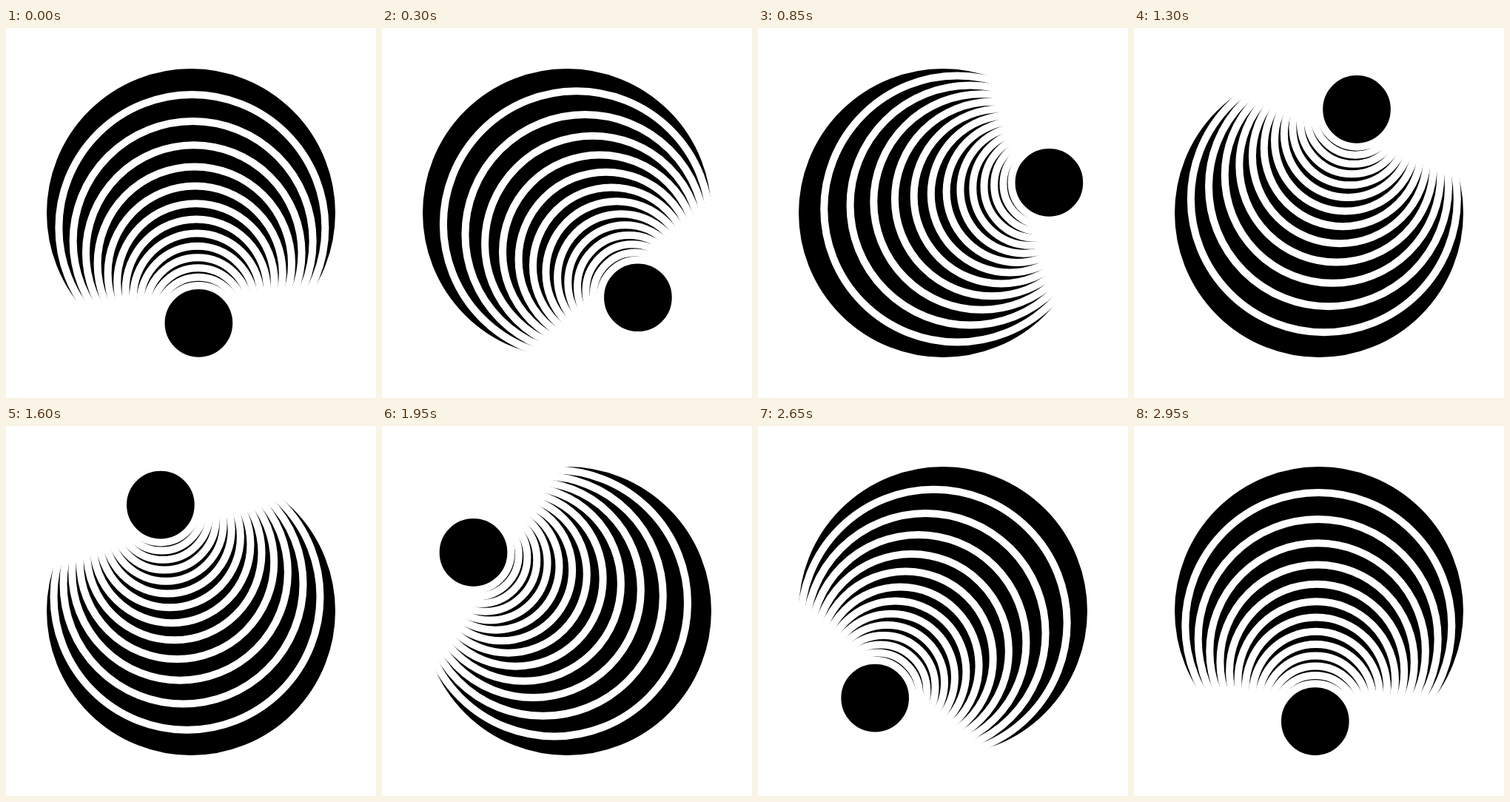
An HTML page with a canvas that plays this animation: 500 px wide and 500 px high, repeating every 3 s.

```html
<!DOCTYPE html>
<html lang="en">
<head>
<meta charset="utf-8">
<title>Rolling circles</title>
<style>
  html, body { margin: 0; width: 100%; height: 100%; overflow: hidden; background: #fff; }
  canvas { display: block; width: 500px; height: 500px; }
</style>
</head>
<body>
<canvas id="stage" width="500" height="500"></canvas>
<script>
const ctx = document.getElementById('stage').getContext('2d');
const CENTER = 250, RADIUS = 200, SHRINK = 0.9, COUNT = 14;
const STEP = 50, STEPS = 60, START_DEG = 4;

// Nested discs, all touching the outer rim in the same direction.
function draw(step) {
  const angle = (START_DEG + step * 360 / STEPS) * Math.PI / 180;
  ctx.fillStyle = '#fff';
  ctx.fillRect(0, 0, 500, 500);
  ctx.fillStyle = '#000';
  ctx.strokeStyle = '#fff';
  ctx.lineWidth = 10;
  for (let i = 0; i < COUNT; i++) {
    const r = RADIUS * SHRINK ** i;
    const d = RADIUS - r;
    ctx.beginPath();
    ctx.arc(CENTER + d * Math.sin(angle), CENTER + d * Math.cos(angle), r, 0, Math.PI * 2);
    ctx.fill();
    ctx.stroke();
  }
}

function tick() {
  draw(Math.floor(performance.now() / STEP) % STEPS);
  requestAnimationFrame(tick);
}
tick();
</script>
</body>
</html>
```
